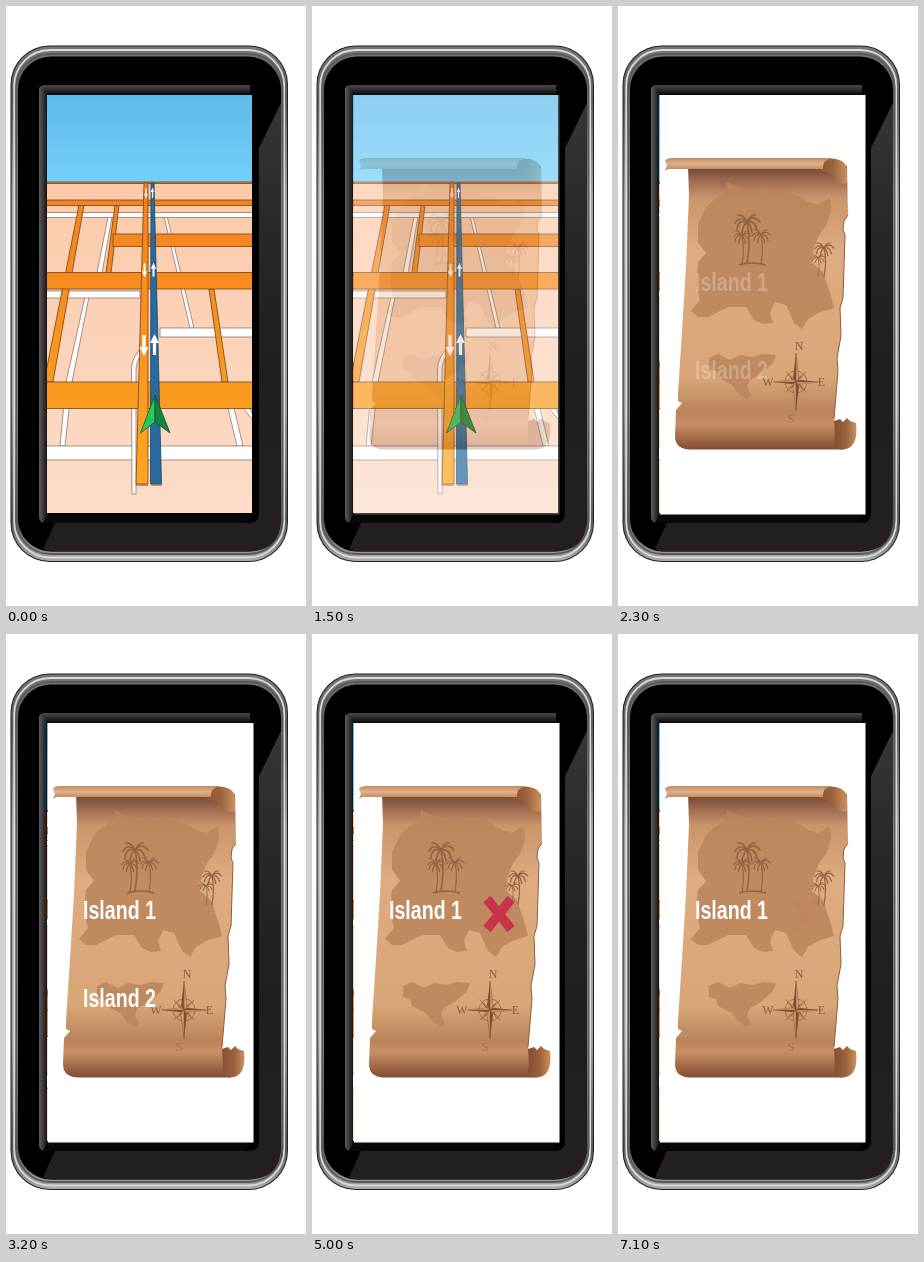
Recreate the animation shown at these times as an HTML page. Size 300x600 px, loop 7.3 s.

```html
<!DOCTYPE html>
<html lang="en">
<head>
<meta charset="utf-8">
<title>Treasure navigator</title>
<style>
  html, body { margin: 0; height: 100%; overflow: hidden; background: #fff; }
  svg { display: block; width: 100vw; height: 100vh; }
  .label { font: bold 19.6px "Liberation Sans", Arial, sans-serif; fill: #fff; }
  .compass { font: 12px "Liberation Serif", serif; fill: #8d5c38; }
</style>
</head>
<body>
<svg viewBox="0 0 300 600">
  <defs>
    <linearGradient id="silver" x2="0" y2="1">
      <stop stop-color="#777"/><stop offset=".1" stop-color="#5c5c5c"/>
      <stop offset=".3" stop-color="#a0a0a0"/><stop offset=".7" stop-color="#999"/>
      <stop offset=".92" stop-color="#555"/><stop offset="1" stop-color="#aaa"/>
    </linearGradient>
    <linearGradient id="gloss" x2="0" y2="1">
      <stop stop-color="#363638"/><stop offset=".25" stop-color="#29282a"/>
      <stop offset=".6" stop-color="#1f1d1e"/><stop offset="1" stop-color="#242021"/>
    </linearGradient>
    <linearGradient id="bevelX">
      <stop stop-color="#5c5c5e"/><stop offset=".5" stop-color="#353536"/><stop offset="1" stop-color="#0a0a0a"/>
    </linearGradient>
    <linearGradient id="bevelY" x2="0" y2="1">
      <stop stop-color="#48484a"/><stop offset=".4" stop-color="#323234"/><stop offset="1" stop-color="#050505"/>
    </linearGradient>
    <linearGradient id="sky" x2="0" y2="1">
      <stop stop-color="#5dbbeb"/><stop offset="1" stop-color="#74d0f9"/>
    </linearGradient>
    <linearGradient id="ground" x2="0" y2="1">
      <stop stop-color="#fbcaa9"/><stop offset="1" stop-color="#fddcc9"/>
    </linearGradient>
    <linearGradient id="road" gradientUnits="userSpaceOnUse" x1="0" y1="180" x2="0" y2="480">
      <stop stop-color="#f57f1f"/><stop offset="1" stop-color="#fda820"/>
    </linearGradient>
    <linearGradient id="sheet" x2="0" y2="1">
      <stop stop-color="#70442f"/><stop offset=".04" stop-color="#94614a"/>
      <stop offset=".11" stop-color="#c99469"/><stop offset=".3" stop-color="#deac80"/>
      <stop offset=".75" stop-color="#d8a577"/><stop offset=".87" stop-color="#bb8359"/>
      <stop offset=".91" stop-color="#c78f63"/><stop offset="1" stop-color="#834c30"/>
    </linearGradient>
    <linearGradient id="roll" x2="0" y2="1">
      <stop stop-color="#c08a62"/><stop offset=".45" stop-color="#e0b18a"/><stop offset="1" stop-color="#b57e58"/>
    </linearGradient>
    <linearGradient id="curl">
      <stop stop-color="#85502e"/><stop offset=".55" stop-color="#9c623f"/><stop offset="1" stop-color="#cb925d"/>
    </linearGradient>
    <clipPath id="screen"><path d="M41 89H246V507H41Z"/></clipPath>
    <g id="palm" fill="none" stroke-linecap="round">
      <path d="M0 0Q4 17 0 41" stroke-width="1.6"/>
      <path d="M0 0Q-7-7-12 1M0 0Q-9-3-10 8M0 0Q-4 3-5 11M0 0Q-4-8-9-7M0 0Q7-8 13 0M0 0Q8-2 10 8M0 0Q4 3 5 11M0 0Q4-8 8-7" stroke-width="1.7"/>
    </g>
    <path id="arrow" d="M0-11L4.500-2H1.600V10H-1.600V-2H-4.500Z" fill="#fff"/>
    <path id="needle" d="M0 0L-3-4L0-29Z"/>
  </defs>

  <!-- phone -->
  <rect x="4.500" y="39.500" width="277.500" height="516.500" rx="39" fill="#222"/>
  <rect x="5.500" y="40.500" width="275.500" height="514.500" rx="38" fill="url(#silver)"/>
  <rect x="8.200" y="44" width="270" height="507.500" rx="36" fill="none" stroke="#dadada" stroke-width="1.800"/>
  <rect x="10.500" y="48" width="266" height="500" rx="34" fill="none" stroke="#5a5a5c" stroke-width="1.800"/>
  <rect x="12" y="50.500" width="263" height="495" rx="33"/>
  <path d="M275 97L253 142V507Q253 517 243 517H49L37 543Q41 545.500 46 545.500H242Q275 545.500 275 512Z" fill="url(#gloss)"/>
  <path d="M33 84Q33 79 39 79H244V89H42Z" fill="url(#bevelY)"/>
  <path d="M33 84Q33 80 36 81L42 89V508L37 517Q33 515 33 511Z" fill="url(#bevelX)"/>
  <path d="M42 508H246L240 517H37Z" fill="#080808"/>

  <!-- road map -->
  <g clip-path="url(#screen)">
    <path d="M41 89H246V177H41Z" fill="url(#sky)"/>
    <path d="M41 176H246V507H41Z" fill="url(#ground)"/>
    <g fill="#fff" stroke="#86695a" stroke-width=".7">
      <path d="M102 211H106L96 267H91Z"/>
      <path d="M158 210H161L188 322H184Z"/>
      <path d="M79 291H83L66 376L59 440H54L60 376Z"/>
      <path d="M222 402H228L237 440H231Z"/>
      <path d="M237 402H244L250 418Z"/>
      <path d="M40 206.500H247V211.500H40Z"/>
      <path d="M40 285H134V292H40Z"/>
      <path d="M154 322H247V331H154Z"/>
      <path d="M40 440H247V454H40Z"/>
      <path d="M135 342V350Q130 355 130 365V488H126L125.500 362Q126 352 135 342Z"/>
    </g>
    <g fill="url(#road)" stroke="#70441a" stroke-width=".8">
      <path d="M40 176H247V177.500H40Z"/>
      <path d="M73 199H78L47 376H38Z"/>
      <path d="M109 199H113L105 267H100Z"/>
      <path d="M203 283H208L222 376H216Z"/>
      <path d="M40 194H247V199.500H40Z"/>
      <path d="M107 228H247V240.500H107Z"/>
      <path d="M40 266.500H247V283H40Z"/>
      <path d="M40 376H247V402.500H40Z"/>
      <path d="M138 177H142V478H130Z"/>
    </g>
    <path d="M145 177H148L155.500 478H144.500Z" fill="#276b9f" stroke="#164466" stroke-width=".8"/>
    <path d="M130 479H142M145 479H156" stroke="#8b4b15"/>
    <use href="#arrow" transform="translate(138 339) scale(1 -1)"/>
    <use href="#arrow" transform="translate(148.500 339)"/>
    <use href="#arrow" transform="translate(138.500 264) scale(.6 -.65)"/>
    <use href="#arrow" transform="translate(147.500 264) scale(.6 .65)"/>
    <use href="#arrow" transform="translate(140 187) scale(.4 -.5)"/>
    <use href="#arrow" transform="translate(146.500 187) scale(.4 .5)"/>
    <path d="M149 389L134.500 427L149 416Z" fill="#2cc65a" stroke="#145c2c" stroke-width=".8"/>
    <path d="M149 389L164 427L149 416Z" fill="#14853e" stroke="#0d4a25" stroke-width=".8"/>
  </g>

  <!-- parchment -->
  <g id="parchment" opacity="0">
    <path d="M42 89H247.500V508.500H42Z" fill="#fff"/>
    <path d="M70 160H229L230 209L226 215L225 224L227 229L225 292L222 302L223 330L219 352L220 365L216 413L225 443.500H72Q57 443 57 430L58 404L64 397L60 395L60 387L64 325L68 260L71 190Z" fill="url(#sheet)"/>
    <path d="M230 209L226 215L225 224L227 229L225 292L222 302L223 330L219 352L220 365L216 413" fill="none" stroke="#8d5d40"/>
    <path d="M197 153Q229 149 229 164V177Q222 180 215 173Q211 164 199 166Z" fill="url(#curl)"/>
    <path d="M47 155Q48 152 54 152H214Q204 154 205 163H50L47 165L49 160Z" fill="url(#roll)"/>
    <path d="M216 415L222 413L225 416L229 412L232 415L238 417Q241 443 224 443.500Q214 443 217 430Z" fill="url(#curl)"/>
    <g fill="#ba855a" fill-opacity=".85">
      <path d="M108 186L109 176L119 181L130 184L145 187L160 182L172 187L181 190L190 196L200 199L212 192L213 205L208 220L201 229L196 242L193 256L205 266L213 290L216 302L200 307L190 313L184 323L176 317L168 299L157 296L152 307L155 317L145 318L136 314L128 301L110 301L100 306L90 311L80 311L73 305L82 294L78 278L80 256L88 247L80 236L80 218L88 201L98 192Z"/>
      <path d="M91 352L100 348L112 354L122 349L135 351L145 348L158 349L155 357L143 368L132 374L129 380L133 390L128 393L120 387L114 379L100 372L98 365L91 363Z"/>
    </g>
    <g stroke="#946440">
      <use href="#palm" transform="translate(129 216)"/>
      <use href="#palm" transform="translate(124 230) scale(.7)"/>
      <use href="#palm" transform="translate(143 229) scale(.7)"/>
      <path d="M121 259Q134 255 148 259" fill="none" stroke-width="1.500"/>
      <use href="#palm" transform="translate(206 242) scale(.75 .7)"/>
      <use href="#palm" transform="translate(200 252) scale(.6 .45)"/>
    </g>
    <g transform="translate(178 376)">
      <circle r="11" fill="none" stroke="#8d5c38" stroke-width=".7"/>
      <g id="rose"></g>
    </g>
    <g class="compass" text-anchor="middle">
      <text x="181" y="344">N</text><text x="203.500" y="380">E</text>
      <text x="150" y="380">W</text><text x="173" y="417" opacity=".55">S</text>
    </g>
  </g>

  <text id="first" class="label" transform="translate(77 285) scale(1 1.28)" opacity="0">Island 1</text>
  <text id="second" class="label" transform="translate(77 373) scale(1 1.28)" opacity="0">Island 2</text>
  <path id="cross" d="M175 265L199 295M199 265L175 295" stroke="#c8334a" stroke-width="9.500" opacity="0"/>
</svg>
<script>
  const LOOP = 7300, STEP = 100;
  const byId = id => document.getElementById(id);
  const ramp = (t, from, to) => Math.min(1, Math.max(0, (t - from) / (to - from)));
  const show = (id, opacity) => byId(id).setAttribute('opacity', opacity);

  // Short diagonal points lie beneath the four main ones.
  const point = (angle, size) =>
    `<g transform="rotate(${angle}) scale(${size})"><use href="#needle" fill="#80502f"/>` +
    `<use href="#needle" transform="scale(-1 1)" fill="#cf9b6d" stroke="#80502f" stroke-width=".5"/></g>`;
  byId('rose').innerHTML = [45, 135, 225, 315].map(a => point(a, .5)).join('') +
    [0, 180].map(a => point(a, 1)).join('') + [90, 270].map(a => point(a, .78)).join('');

  const start = performance.now();
  function draw(now) {
    const elapsed = Math.max(0, now - start) % LOOP;
    const t = Math.min(LOOP - 2 * STEP, Math.floor(elapsed / STEP) * STEP);
    const labels = ramp(t, 2100, 2900);
    const swap = ramp(t, 4200, 4900);
    show('parchment', ramp(t, 1300, 2000));
    show('first', labels);
    show('second', labels * (1 - swap));
    show('cross', swap * (1 - ramp(t, 6500, 7120)));
    requestAnimationFrame(draw);
  }
  draw(start);
</script>
</body>
</html>
```
